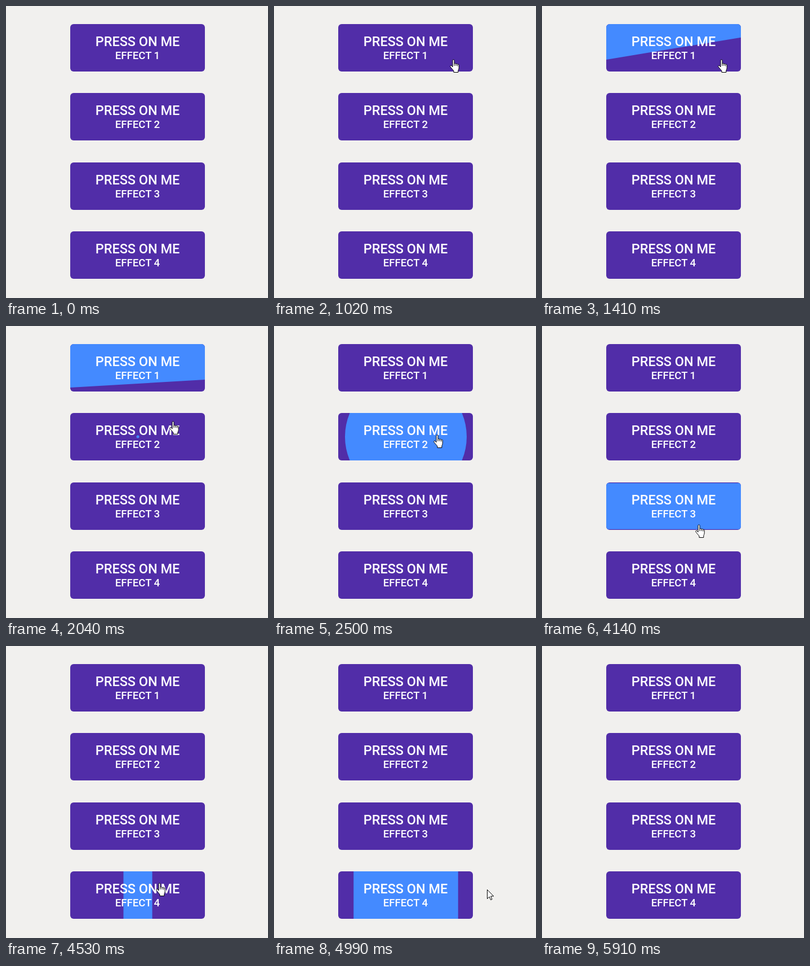
Recreate the animation shown at these times as an HTML page. Size 465x517 px, loop 6.16 s.

```html
<!DOCTYPE html>
<html lang="en">
<head>
<meta charset="utf-8">
<title>Button press effects</title>
<style>
  html, body { margin: 0; width: 100%; height: 100%; overflow: hidden; background: #f1f0ee; }
  svg { display: block; width: 465px; height: 517px; }
  text { font-family: Roboto, "Open Sans", sans-serif; font-weight: 500; fill: #fff; text-anchor: middle; }
  .title { font-size: 23.45px; }
  .label { font-size: 18.6px; }
  .base { fill: #512da8; }
  .fill { fill: #448aff; }
  .cursor { fill: #fff; stroke: #000; stroke-linejoin: round; }
</style>
</head>
<body>
<svg viewBox="0 0 465 517">
  <defs>
    <clipPath id="card"><rect width="239" height="84" rx="6"/></clipPath>
  </defs>
  <g id="buttons"></g>
  <g id="pointer" class="cursor">
    <path id="hand" transform="translate(-6)"
      d="M5 14V2.5a1.5 1.5 0 0 1 3 0V8.5c.3-1.2 2.8-1 3 .4.5-1 2.6-.6 2.8.7.7-.9 2.4-.3 2.4 1.1V15.5c0 2.5-1.3 3.5-1.4 5.5v2.5H7V21C5.8 19 3 16.5 1 13.5.2 12 1.8 10.6 3 11.6L5 14ZM8 8.5v3.5M11 9v3M13.8 10v2.5"/>
    <path id="arrow" d="M.5.5V16.5L4.2 13 6.6 18.5 9 17.5 6.7 12H11.8Z"/>
  </g>
</svg>
<script>
const LOOP = 6160, STEP = 77.7;   // the picture advances in steps of about 13 per second
const W = 239, H = 84, LEFT = 114, GAP = 122.4;
const SHAPES = ['polygon', 'circle', 'rect', 'rect'];
const TOPS = SHAPES.map((_, i) => Math.round(32 + GAP * i));

const $ = id => document.getElementById(id);
const smooth = v => v * v * (3 - 2 * v);
const ramp = (n, from, to) => Math.min(1, Math.max(0, (n - from) / (to - from)));
const pulse = (n, inA, inB, outA, outB) =>
  smooth(ramp(n, inA, inB)) * (1 - smooth(ramp(n, outA, outB)));
const set = (el, attrs) => { for (const key in attrs) el.setAttribute(key, attrs[key]); };

// The pointer visits each button in turn, then leaves
const ENTER = 7, EXIT = 71, ORIGIN = { x: 460, y: 230 };
const MOVES = [
  { from: ENTER, to: 9, x: 405, y: 114 },
  { from: 9, to: 13, x: 318, y: 94 },
  { from: 23, to: 27, x: 289, y: 192 },
  { from: 37, to: 45.4, x: 282, y: 310 },
  { from: 50, to: 58.7, x: 271, y: 428 },
  { from: 60, to: 67, x: 458, y: 434 },
  { from: 67, to: EXIT, x: 460, y: 520 }
];

const pointerAt = n => MOVES.reduce((at, move) => {
  const p = ramp(n, move.from, move.to);
  return { x: at.x + (move.x - at.x) * p, y: at.y + (move.y - at.y) * p };
}, ORIGIN);

const overButton = ({ x, y }) =>
  x >= LEFT && x <= LEFT + W && TOPS.some(top => y >= top && y <= top + H);

$('buttons').innerHTML = TOPS.map((top, i) => `
  <g transform="translate(${LEFT} ${top})">
    <g clip-path="url(#card)">
      <rect class="base" width="${W}" height="${H}"/>
      <${SHAPES[i]} class="fill"/>
    </g>
    <text class="title" x="${W / 2}" y="39">PRESS ON ME</text>
    <text class="label" x="${W / 2}" y="62">EFFECT ${i + 1}</text>
  </g>`).join('');

const [wedge, disc, band, column] = document.querySelectorAll('.fill');

function draw(time) {
  const n = Math.floor((time % LOOP) / STEP);

  const swing = smooth(ramp(n, 14, 20)) * (1 - ramp(n, 25.38, 32));
  const edge = 85 * swing;
  const rise = W * Math.tan(36 * (1 - swing) * Math.PI / 180);
  set(wedge, { points: `0,-200 ${W},-200 ${W},${edge - rise} 0,${edge}` });

  set(disc, { cx: 120, cy: 42, r: 108 * pulse(n, 25.5, 31, 38.5, 44) });

  const tall = H * pulse(n, 42.75, 48, 52.5, 57.5);
  set(band, { width: W, y: (H - tall) / 2, height: tall });

  const wide = W * pulse(n, 56.64, 61.2, 62.5, 67.4);
  set(column, { height: H, x: (W + 1 - wide) / 2, width: wide });

  const at = pointerAt(n), over = overButton(at);
  set($('pointer'), {
    transform: `translate(${Math.round(at.x)} ${Math.round(at.y)})`,
    display: n >= ENTER && n < EXIT ? 'inline' : 'none'
  });
  set($('hand'), { display: over ? 'inline' : 'none' });
  set($('arrow'), { display: over ? 'none' : 'inline' });
}

const start = performance.now();
function tick() {
  draw(performance.now() - start);
  requestAnimationFrame(tick);
}
tick();
</script>
</body>
</html>
```
